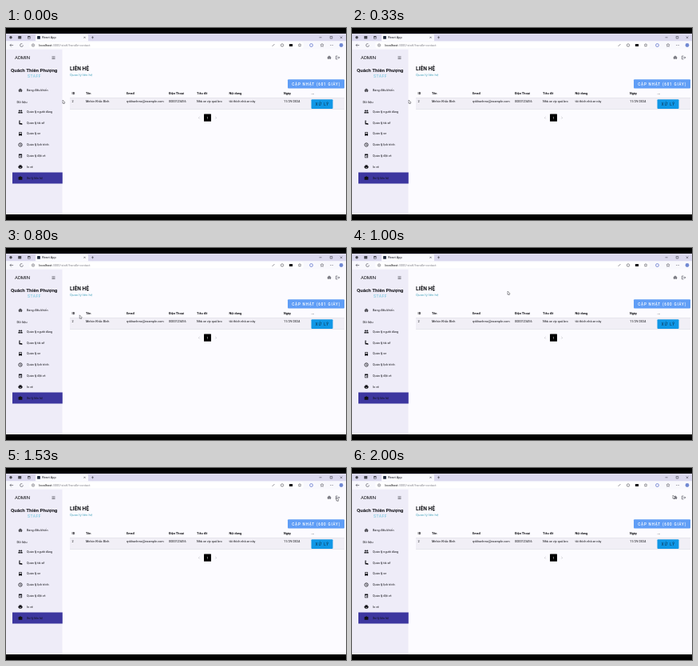
Animation, 426 px wide and 240 px high, one loop 2.07 s. Source, as an HTML page with a canvas:

```html
<!DOCTYPE html>
<html lang="vi">
<head>
<meta charset="utf-8">
<title>React App</title>
<style>
html, body { margin: 0; width: 100%; height: 100%; overflow: hidden; background: #000; }
canvas { display: block; width: 426px; height: 240px; }
</style>
</head>
<body>
<canvas id="stage" width="426" height="240"></canvas>
<script>
const ctx = document.getElementById('stage').getContext('2d');
const LOOP = 2070;
const INK = '#111116', GREY = '#45454f', SIDE = '#eeecf8';

function box(x, y, w, h, color = INK, r = 0) {
  ctx.fillStyle = color;
  ctx.beginPath();
  ctx.roundRect(x, y, w, h, r);
  ctx.fill();
}

// A box placed by its centre.
const block = (x, y, w, h, color, r) => box(x - w / 2, y - h / 2, w, h, color, r);
const dot = (x, y, r, color) => block(x, y, 2 * r, 2 * r, color, r);

function text(str, x, y, size, o = {}) {
  ctx.font = `${o.weight || 400} ${size}px Roboto, "Noto Sans", sans-serif`;
  ctx.letterSpacing = (o.gap || 0) + 'px';
  ctx.textAlign = o.align || 'left';
  ctx.fillStyle = o.color || INK;
  ctx.fillText(str, x, y);
}

function stroke(color, width = 0.6) {
  ctx.strokeStyle = color;
  ctx.lineWidth = width;
  ctx.stroke();
}

function line(x, y, pts, color = GREY, width) {
  ctx.beginPath();
  for (const [dx, dy] of pts) ctx.lineTo(x + dx, y + dy);
  stroke(color, width);
}

function ring(x, y, r, color = GREY, width, sweep = 2 * Math.PI) {
  ctx.beginPath();
  ctx.arc(x, y, r, 0, sweep);
  stroke(color, width);
}

function bars(x, y, r, turn = 0, count = 2) {
  for (let i = 0; i < count; i++) {
    const a = turn + i * Math.PI / 2;
    const dx = r * Math.cos(a), dy = r * Math.sin(a);
    line(x, y, [[-dx, -dy], [dx, dy]]);
  }
}

const chevron = (x, y, dir, r, color) => line(x, y, [[-dir * r / 2, -r], [dir * r / 2, 0], [-dir * r / 2, r]], color);

function star(x, y, r) {
  const pts = Array.from({ length: 11 }, (_, i) => {
    const a = i * Math.PI / 5, d = i % 2 ? r / 2 : r;
    return [d * Math.sin(a), -d * Math.cos(a)];
  });
  line(x, y, pts, GREY, 0.5);
}

const icons = {
  home(x, y, color = INK) {
    line(x, y, [[-2.4, 0], [0, -2.1], [2.4, 0]], color, 0.8);
    for (const side of [-1, 1]) block(x + side * 1.1, y + 1, 1.1, 2.2, color);
    block(x, y - 0.2, 3, 1, color);
  },
  people(x, y) {
    for (const side of [-1, 1]) {
      dot(x + side * 1.2, y - 1.1, 1);
      block(x + side * 1.4, y + 1.2, 2.5, 1.6, INK, 0.6);
    }
  },
  seat(x, y) {
    dot(x - 1, y - 2, 0.8);
    line(x, y, [[-1.3, -1], [-0.8, 1.4], [1.6, 1.4], [2, 2.4]], INK, 1.3);
  },
  bus(x, y) {
    block(x, y, 4, 4.4, INK, 0.7);
    block(x, y - 0.7, 3, 1.4, SIDE);
    for (const side of [-1, 1]) block(x + side * 1.2, y + 2.1, 0.9, 0.9);
  },
  clock(x, y) {
    ring(x, y, 2.2, INK, 0.75);
    line(x, y, [[0, -1.4], [0, 0.2], [1, 0.8]], INK);
  },
  calendar(x, y) {
    block(x, y, 4.2, 4.8, INK, 0.5);
    block(x, y + 0.6, 3, 2.4, SIDE);
    block(x + 0.7, y + 0.9, 1.1, 1.1);
  },
  printer(x, y) {
    block(x, y, 2.9, 4.6);
    block(x, y + 0.1, 5, 2.4, INK, 0.7);
    block(x, y + 1.2, 2, 0.9, SIDE);
  },
  briefcase(x, y) {
    block(x, y + 0.4, 4.8, 3.7, INK, 0.5);
    block(x, y - 1.6, 1.9, 1);
  },
  exit(x, y) {
    line(x, y, [[0, -2], [-2, -2], [-2, 2], [0, 2]]);
    line(x, y, [[-0.8, 0], [2.4, 0]]);
    chevron(x + 1.8, y, 1, 1.2);
  }
};

function tabStrip() {
  const y = 11.8;
  box(0, 7, 426, 9.4, '#dad7ee');
  box(37, 8, 66, 9, '#fafaff', 1.5);
  dot(6, y, 1.7, GREY);
  block(17.2, y, 4, 3.6, GREY, 0.6);
  block(28.8, y, 3.4, 3.4, GREY, 0.6);
  block(28.8, y + 0.5, 2.2, 1.4, '#dad7ee');
  block(41, y, 3.8, 3.8, '#202a3c', 0.5);
  text('React App', 45.2, 13.2, 3.8);
  bars(98.5, y, 1.4, Math.PI / 4);
  bars(108.5, y, 1.5);
  bars(394, y, 1.5, 0, 1);
  line(407.5, y, [[-1.3, -1.3], [1.3, -1.3], [1.3, 1.3], [-1.3, 1.3], [-1.3, -1.6]]);
  bars(420, y, 1.8, Math.PI / 4);
}

function toolbar() {
  const y = 21.5;
  box(0, 16.4, 426, 10.4, '#f8f8fd');
  box(29, 17.4, 344, 8.2, '#fff', 4);
  bars(7, y, 2.1, 0, 1);
  chevron(5.8, y, -1, 1.7);
  ring(19.5, y, 1.9, GREY, 0.6, 5.2);
  ring(34, y, 1.7, GREY, 0.5);
  bars(34, y, 0.8, Math.PI / 2, 1);
  const host = 'localhost';
  text(host, 41.2, 23, 4);
  text(':3000/staff/handle-contact', 41.2 + ctx.measureText(host).width, 23, 4, { color: '#85858f' });
  bars(335, y, 2, -Math.PI / 4, 1);
  ring(346, y, 1.7);
  block(357, y, 4.2, 3, INK, 0.5);
  star(368, y, 2);
  ring(382.5, y, 1.9, '#4c64c6', 0.7);
  star(396, y, 2.2);
  for (const d of [-1.5, 0, 1.5]) dot(408 + d, y, 0.4, GREY);
  dot(420, y, 2.4, '#7189d2');
}

function sidebar() {
  const groups = {
    people: 'Quản lý người dùng', seat: 'Quản lý tài xế', bus: 'Quản lý xe',
    clock: 'Quản lý lịch trình', calendar: 'Quản lý đặt vé', printer: 'In vé',
    briefcase: 'Xử lý liên hệ'
  };
  const item = (icon, label, y) => {
    icons[icon](18, y);
    text(label, 26, y + 1.3, 3.75);
  };
  box(0, 26.8, 70.5, 206.2, SIDE);
  text('ADMIN', 11, 39.3, 6);
  for (const d of [-1.4, 0, 1.4]) bars(59.5, 37.2 + d, 2, 0, 1);
  text('Quách Thiên Phượng', 35.2, 55.2, 6.2, { weight: 700, align: 'center' });
  text('STAFF', 35.6, 62, 5, { gap: 0.5, align: 'center', color: '#69c3dc' });
  text('Dữ liệu', 13.5, 93.8, 4.2);
  box(8, 180.4, 62.8, 14.1, '#3d379f');
  item('home', 'Bảng điều khiển', 78);
  Object.entries(groups).forEach(([icon, label], i) => item(icon, label, 104.5 + 13.83 * i));
}

function table() {
  const columns = [
    [82.5, 'ID', '2'],
    [100, 'Tên', 'Melvin Khắc Bình'],
    [151, 'Email', 'qvkhanhmo@example.com'],
    [204, 'Điện Thoại', '0000123456'],
    [239, 'Tiêu đề', 'Nhà xe vip quá bro'],
    [279.5, 'Nội dung', 'tôi thích nhà xe này'],
    [348, 'Ngày', '11/29/2024'],
    [382.5, '...', '']
  ];
  box(80, 87.2, 344, 14.2, '#f1eff6');
  for (const y of [87.1, 101.2]) box(80, y, 344, 0.5, '#dadae2');
  for (const [x, head, cell] of columns) {
    text(head, x, 83.3, 3.9, { weight: 700 });
    text(cell, x, 93.3, 3.85);
  }
  box(382.5, 89.2, 27, 11.7, '#1097e6', 1);
  text('XỬ LÝ', 396.4, 96.7, 4.6, { gap: 1.1, align: 'center', color: '#0b2942' });
  block(252.5, 112.1, 9, 9.3, '#000', 0.6);
  text('1', 252.5, 113.6, 4, { align: 'center', color: '#fff' });
  for (const dir of [-1, 1]) chevron(252.5 + dir * 10.5, 112.2, dir, 1.2, '#a9a9b4');
}

function content(seconds) {
  icons.home(405, 37, GREY);
  icons.exit(415.4, 37);
  text('LIÊN HỆ', 80, 52.8, 6.6, { weight: 700 });
  text('Quản lý liên hệ', 80, 60.4, 4.4, { color: '#4ca6bd' });
  box(353, 64.2, 71, 11.4, '#609ef6', 1);
  text(`CẬP NHẬT (${seconds} GIÂY)`, 388.7, 71.6, 4.6, { gap: 0.8, align: 'center', color: '#fff', weight: 500 });
  table();
}

const ease = (t, from, to) => {
  const k = Math.min(1, Math.max(0, (t - from) / (to - from)));
  return k * k * (3 - 2 * k);
};

// Right to the heading, on to the window edge, then back to the home icon.
function pointer(t) {
  const a = ease(t, 730, 1000), b = ease(t, 1000, 1270), c = ease(t, 1400, 1670);
  const x = 71 + 124 * a + 230 * b - 23 * c;
  const y = 90 - 36 * a - 14.5 * b - 5.5 * c;
  ctx.beginPath();
  for (const [dx, dy] of [[0, 0], [0, 4.4], [1, 3.5], [1.9, 5], [2.3, 3.2], [3.1, 3.1]]) ctx.lineTo(x + dx, y + dy);
  ctx.closePath();
  ctx.fillStyle = '#fff';
  ctx.fill();
  stroke('#3c3c44', 0.5);
}

function draw(t) {
  box(0, 0, 426, 240, '#000');
  box(0, 7, 426, 226, '#fcfbff');
  tabStrip();
  toolbar();
  sidebar();
  content(t < 870 ? 601 : 600);
  pointer(t);
}

const start = performance.now();
function tick() {
  draw((performance.now() - start) % LOOP);
  requestAnimationFrame(tick);
}
tick();
</script>
</body>
</html>
```
